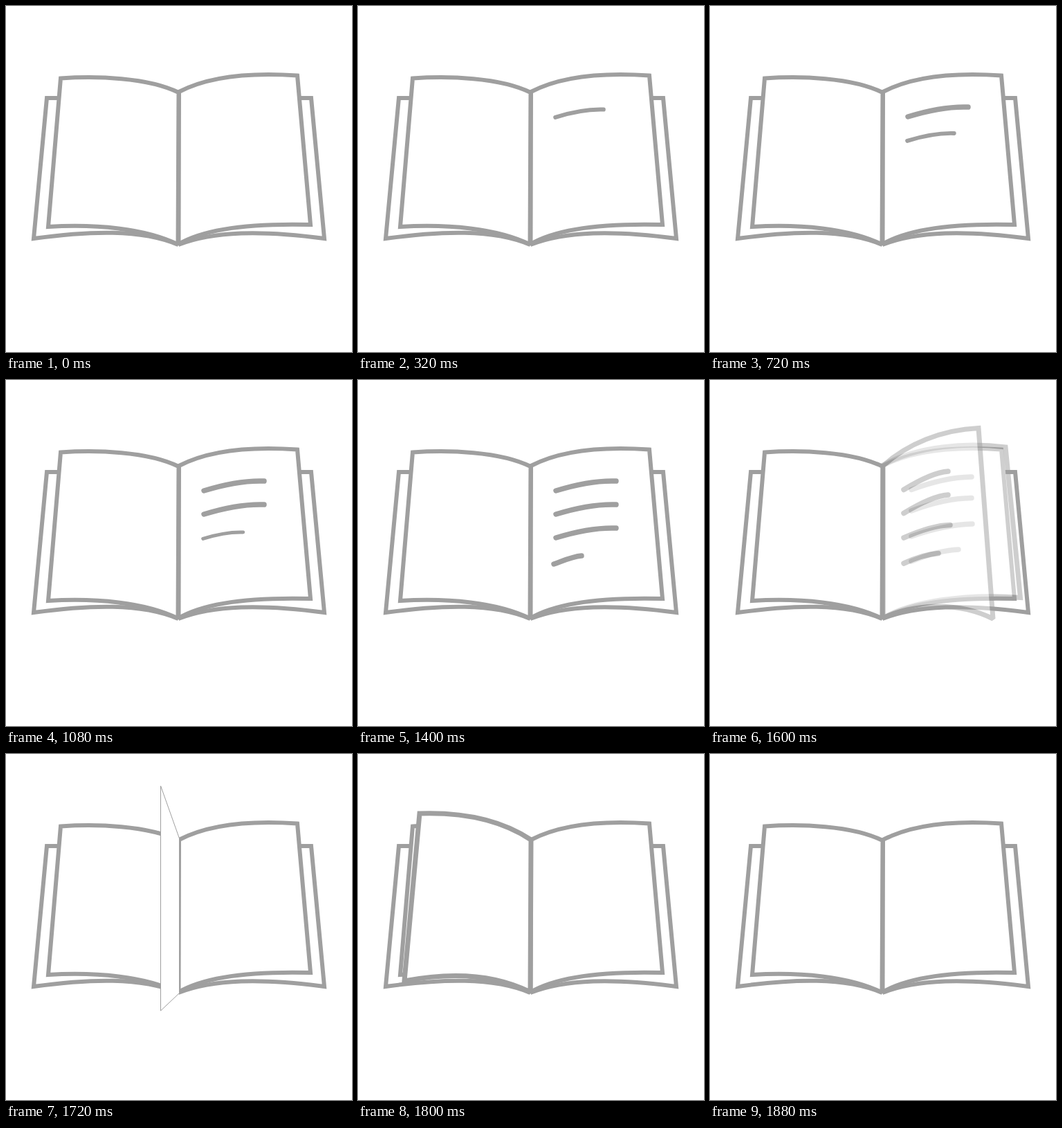
An HTML page that plays this animation: 500x500 px, repeating every 2760 ms.

```html
<!DOCTYPE html>
<html lang="en">
<head>
<meta charset="utf-8">
<title>Open book</title>
<style>
  html, body { margin: 0; width: 100%; height: 100%; overflow: hidden; background: #fff; }
  svg { display: block; width: 100vw; height: 100vh; }
  path { fill: none; stroke: #9f9f9f; stroke-width: 6; stroke-miterlimit: 1.8; }
  .sheet { fill: #fff; }
  .turn { stroke-width: 7; }
  .edge { stroke-width: 1; stroke-miterlimit: 4; }
  .line { stroke-width: 7.5; stroke-linecap: round; }
</style>
</head>
<body>
<svg viewBox="0 0 500 500">
  <g id="book">
    <path d="M80 133H59L40 336C120 325 195 322 249 345"/>
    <path d="M422 133H441L460 336C370 324 300 325 249 345"/>
    <path class="sheet" d="M79 104.5C130 101 205 103 249.5 125L248.5 344.500C200 321 130 315 61 319Z"/>
    <path class="sheet" d="M250 124C300 98 370 97 421 100.500L440 316C360 314 290 320 249.500 344Z"/>
  </g>
  <g id="text"></g>
  <g id="pages"></g>
</svg>
<script>
const LOOP = 2760, TICK = 40, FADE = 80, FIRST_TURN = 1560;
const textGroup = document.getElementById('text');
const pageGroup = document.getElementById('pages');

function add(parent, tag, attrs = {}) {
  const el = document.createElementNS('http://www.w3.org/2000/svg', tag);
  for (const key in attrs) el.setAttribute(key, attrs[key]);
  return parent.appendChild(el);
}

const addLine = (parent, d) => add(parent, 'path', { class: 'line', d });

// Each written line grows from its lower left corner.
const longLine = y => `M286 ${y}c29 -9 59 -15 87 -14`;
const lines = [
  { d: longLine(160), x: 282, y: 164, from: 0, to: 400 },
  { d: longLine(194), x: 282, y: 198, from: 440, to: 800 },
  { d: longLine(228), x: 282, y: 232, from: 840, to: 1200 },
  { d: 'M283 266c14 -5 27 -11 40 -12', x: 279, y: 270, from: 1240, to: 1400 }
];
for (const line of lines) line.el = addLine(textGroup, line.d);

// Successive poses of the turning page, cross-faded in this order.
const poses = [
  {
    d: 'M250 123C300 95 370 90 427 97L448.500 314.500C370 308 290 320 250 344Z',
    text: ['M291 158.500q48 -18 87 -18.500', 'M291 189q48 -18 87 -18.500',
           'M291 226q48 -17 88 -18', 'M291 262q40 -16 68 -17']
  },
  {
    d: 'M250 124C285 92 335 72 388 69.500L409 345C355 318 290 325 250 344Z',
    text: ['M280 158.500q41 -25 64 -26.500', 'M280 192.500q41 -25 64 -26.500',
           'M280 228q41 -18 67 -18.500', 'M280 265q28 -13 50 -14.500']
  },
  { d: 'M223.500 46L250.500 122V345.500L223.500 371Z', edge: true },
  { d: 'M250 124C205 94 150 84 89 86L67 328C145 313 205 322 249 344Z' }
];
const pages = poses.map(({ d, edge, text = [] }) => {
  const g = add(pageGroup, 'g');
  add(g, 'path', { class: 'sheet ' + (edge ? 'edge' : 'turn'), d });
  text.forEach(t => addLine(g, t));
  return g;
});

function draw(time) {
  const t = Math.floor((time % LOOP) / TICK) * TICK;

  textGroup.style.display = t < FIRST_TURN ? '' : 'none';
  for (const { el, x, y, from, to } of lines) {
    const s = Math.min(1, (t - from) / (to - from));
    el.style.display = s > 0 ? '' : 'none';
    el.setAttribute('transform', `translate(${x} ${y}) scale(${Math.max(s, 0)}) translate(${-x} ${-y})`);
  }

  pages.forEach((g, i) => {
    const peak = FIRST_TURN + i * FADE;
    const alpha = Math.max(0, 1 - Math.abs(t - peak) / FADE);
    g.style.display = alpha > 0 ? '' : 'none';
    g.setAttribute('opacity', alpha);
  });
}

const start = performance.now();
function frame() {
  draw(performance.now() - start);
  requestAnimationFrame(frame);
}
frame();
</script>
</body>
</html>
```
